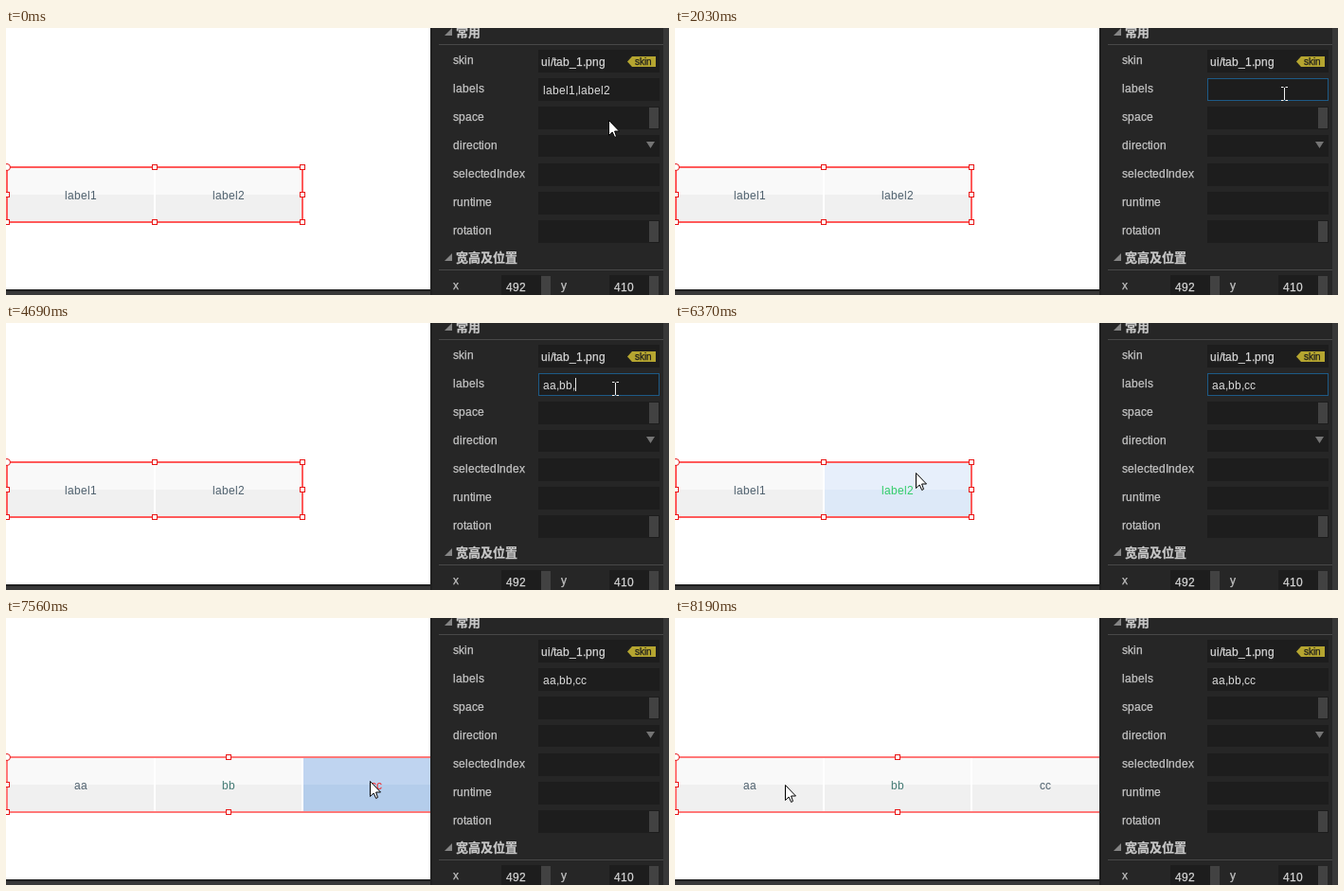
An HTML page that plays this animation: 700 px wide and 282 px high, repeating every 9.17 s.

```html
<!DOCTYPE html>
<html lang="zh-CN">
<head>
<meta charset="utf-8">
<title>Tab labels</title>
<style>
  html, body { margin: 0; width: 100%; height: 100%; overflow: hidden; background: #262626; }
  svg { display: block; width: 100vw; height: 100vh; }
  text { font: 12px "Liberation Sans", Arial, sans-serif; fill: #c4c4c4; white-space: pre; }
  #panel text { stroke: #c4c4c4; stroke-width: .25; }
  #panel .head { font: bold 13px "Noto Sans CJK SC", "Noto Sans CJK", sans-serif; fill: #c8c8c8; }
  #panel .tag { font-size: 10px; fill: #1c1c1c; stroke: #1c1c1c; }
  #panel .value, .value { fill: #dcdcdc; }
</style>
</head>
<body>
<svg viewBox="0 0 700 282">
  <defs>
    <clipPath id="page"><rect width="448" height="276"/></clipPath>
  </defs>
  <rect width="700" height="282" fill="#262626"/>
  <rect y="276" width="449" height="6" fill="#383838"/>
  <rect y="276" width="449" height="2" fill="#202020"/>
  <rect x="448" width="2" height="282" fill="#202020"/>
  <rect x="694" width="6" height="282" fill="#383838"/>
  <rect width="448" height="276" fill="#fff"/>
  <g id="tabs" clip-path="url(#page)"></g>
  <g id="panel"></g>
  <g id="field">
    <rect id="focus" x="562.5" y="53.5" width="127" height="23" fill="none" stroke="#1d5a86"/>
    <rect id="mark" x="567" y="58" width="71" height="14" fill="#3390ff"/>
    <rect id="caret" y="58" width="1" height="14" fill="#e6e6e6"/>
  </g>
  <path id="arrow" d="M.5 .5V16.5L4.2 13 6.7 18.5 8.5 17.5 6.6 12H11.5Z" fill="#fff" stroke="#000" stroke-linejoin="round"/>
  <path id="beam" d="M-3 -6.5H-.5M1.5 -6.5H4M.5 -6V7M-3 7.5H-.5M1.5 7.5H4" fill="none" stroke="#f2f2f2"/>
</svg>
<script>
const LOOP = 9170, STEP = 70;
const NS = 'http://www.w3.org/2000/svg';
const $ = id => document.getElementById(id);
const pen = document.createElement('canvas').getContext('2d');

function add(parent, tag, attrs) {
  const el = document.createElementNS(NS, tag);
  for (const k in attrs) el.setAttribute(k, attrs[k]);
  return parent.appendChild(el);
}
const rect = (parent, x, y, width, height, fill) =>
  add(parent, 'rect', { x, y, width, height, fill });

// Glyph advances snap to whole pixels.
function advances(str, size = 12) {
  pen.font = size + 'px "Liberation Sans", Arial, sans-serif';
  return [...str].map(c => c > '\u2e80' ? size : Math.round(pen.measureText(c).width));
}
const widthOf = str => advances(str).reduce((a, b) => a + b, 0);

function setText(el, str, x, size) {
  const xs = advances(str, size).map(w => (x += w) - w);
  el.setAttribute('x', xs.join(' '));
  el.textContent = str;
}
function label(parent, str, x, y, cls = '', size = 12) {
  const el = add(parent, 'text', { y, class: cls });
  setText(el, str, x, size);
  return el;
}

// Property panel
const panel = $('panel');
const BOX = '#1d1d1d', KNOB = '#424242';

function header(str, y) {
  rect(panel, 457, y + 13, 237, 1, '#484848');
  add(panel, 'path', { d: `M471 ${y - 4}V${y + 4}H463Z`, fill: '#858585' });
  label(panel, str, 475, y + 5, 'head', 13);
}
header('常用', 4);
header('宽高及位置', 242);

['skin', 'labels', 'space', 'direction', 'selectedIndex', 'runtime', 'rotation'].forEach((name, i) => {
  const y = 23 + 30 * i;
  label(panel, name, 472, y + 15);
  rect(panel, 562, y, 128, name === 'direction' ? 23 : 24, BOX);
  if (name === 'space' || name === 'rotation') rect(panel, 679, y + 1, 10, 22, KNOB);
});
label(panel, 'ui/tab_1.png', 565, 40, 'value');
add(panel, 'path', { d: 'M656 35.5L661 30H686V41H661Z', fill: '#b5a530' });
label(panel, 'skin', 664, 39, 'tag', 10);
add(panel, 'path', { d: 'M676 120H685L680.5 127Z', fill: '#747474' });

[['x', 472, '492'], ['y', 586, '410']].forEach(([name, x, value]) => {
  label(panel, name, x, 276);
  rect(panel, x + 51, 261, 42, 21, BOX);
  rect(panel, x + 93, 262, 10, 20, KNOB);
  label(panel, value, x + 56, 278, 'value');
});

// Tab strip: normal, hover and pressed looks
const LOOKS = [
  ['#f9f9f9', '#f0f0f0', '#4f616e'],
  ['#e7effb', '#dde9f8', '#32cc6b'],
  ['#bfd4f0', '#b4cdeb', '#f02828']
];
const strip = $('tabs');
const tabs = [0, 1, 2].map(i => {
  const g = add(strip, 'g', {}), x = 2 + 156 * i;
  return {
    g, mid: x + 77,
    top: rect(g, x, 148, 154, 28),
    low: rect(g, x, 176, 154, 28),
    text: add(g, 'text', { y: 181 })
  };
});
const frame = add(strip, 'rect', { x: 1, y: 147, height: 58, fill: 'none', 'stroke-width': 2 });
const grips = [];
for (const y of [147, 176, 205])
  for (const side of [0, .5, 1])
    if (!(y === 176 && side === .5) && !(y === 147 && side === 0)) {
      const el = add(strip, 'rect', { y: y - 2.5, width: 5, height: 5, fill: '#fff', stroke: '#e81818' });
      grips.push({ el, side });
    }
add(strip, 'circle', { cx: 1, cy: 147, r: 3.5, fill: '#fff', stroke: '#e81818' });

// Labels field
const input = label($('field'), '', 567, 70, 'value');
$('field').insertBefore(input, $('caret'));

// [time, content]
const TYPED = [
  [0, 'label1,label2'], [1540, ''], [2170, 'a'], [2310, 'aa'], [3360, 'aa,'],
  [3710, 'aa,v'], [4130, 'aa,'], [4270, 'aa,b'], [4410, 'aa,bb'],
  [4690, 'aa,bb,'], [4900, 'aa,bb,c'], [5040, 'aa,bb,cc']
];
// [time, x, y]
const PATH = [
  [0, 636, 97], [560, 641, 63], [630, 641, 63], [700, 643, 63], [770, 643, 63],
  [910, 643, 69], [5950, 643, 69], [6020, 620, 84], [6090, 560, 112],
  [6160, 470, 143], [6230, 372, 163], [6300, 290, 162], [6370, 254, 158],
  [7140, 254, 158], [7210, 265, 161], [7280, 301, 167], [7350, 383, 171],
  [7560, 384, 172], [7630, 384, 172], [7980, 116, 176], [LOOP, 116, 176]
];
const within = (t, a, b) => t >= a && t < b;
const show = (el, on) => el.setAttribute('visibility', on ? 'visible' : 'hidden');

function pointer(t) {
  const i = PATH.findIndex(p => p[0] > t);
  const [t0, x0, y0] = PATH[i - 1], [t1, x1, y1] = PATH[i];
  const k = (t - t0) / (t1 - t0);
  return [Math.round(x0 + (x1 - x0) * k), Math.round(y0 + (y1 - y0) * k)];
}

function tabLook(i, t, x, y) {
  if (i === 2 && within(t, 7490, 7630) || i === 0 && within(t, 8120, 8190)) return 2;
  const over = y >= 148 && y < 204 && within(x, 2 + 156 * i, 156 + 156 * i);
  const quiet = within(t, 6510, 7210) || t >= 8190 || i === 2 && t >= 7630;
  return over && !quiet ? 1 : 0;
}

function drawTabs(t, x, y) {
  const wide = t >= 6510;
  const names = wide ? ['aa', 'bb', 'cc'] : ['label1', 'label2', ''];
  const width = wide ? 468 : 312;
  tabs.forEach((tab, i) => {
    const look = tabLook(i, t, x, y), [top, low, ink] = LOOKS[look];
    show(tab.g, wide || i < 2);
    tab.top.setAttribute('fill', top);
    tab.low.setAttribute('fill', low);
    tab.text.style.fill = i === 1 && !look && t >= 7350 ? '#437a74' : ink;
    setText(tab.text, names[i], tab.mid - Math.round(widthOf(names[i]) / 2));
  });
  frame.setAttribute('width', width);
  frame.setAttribute('stroke', wide ? '#ff7878' : '#ff5a5a');
  for (const { el, side } of grips) el.setAttribute('x', 1 + width * side - 2.5);
}

function drawField(t) {
  const [since, str] = TYPED.filter(k => k[0] <= t).pop();
  const marked = within(t, 700, 1540);
  const focused = within(t, 700, 6510);
  setText(input, str, 567);
  input.style.fill = marked ? '#fff' : '';
  show($('focus'), focused);
  show($('mark'), marked);
  show($('caret'), focused && !marked && (t - since) % 910 < 490 && t < 6370);
  $('caret').setAttribute('x', 567 + widthOf(str));
}

function render(ms) {
  const t = Math.floor(ms % LOOP / STEP) * STEP;
  const [x, y] = pointer(t);
  const editing = within(t, 700, 6020);
  drawTabs(t, x, y);
  drawField(t);
  show($('arrow'), !editing);
  show($('beam'), editing);
  $(editing ? 'beam' : 'arrow').setAttribute('transform', `translate(${x} ${y})`);
}

const start = performance.now();
function tick() {
  render(performance.now() - start);
  requestAnimationFrame(tick);
}
tick();
</script>
</body>
</html>
```
